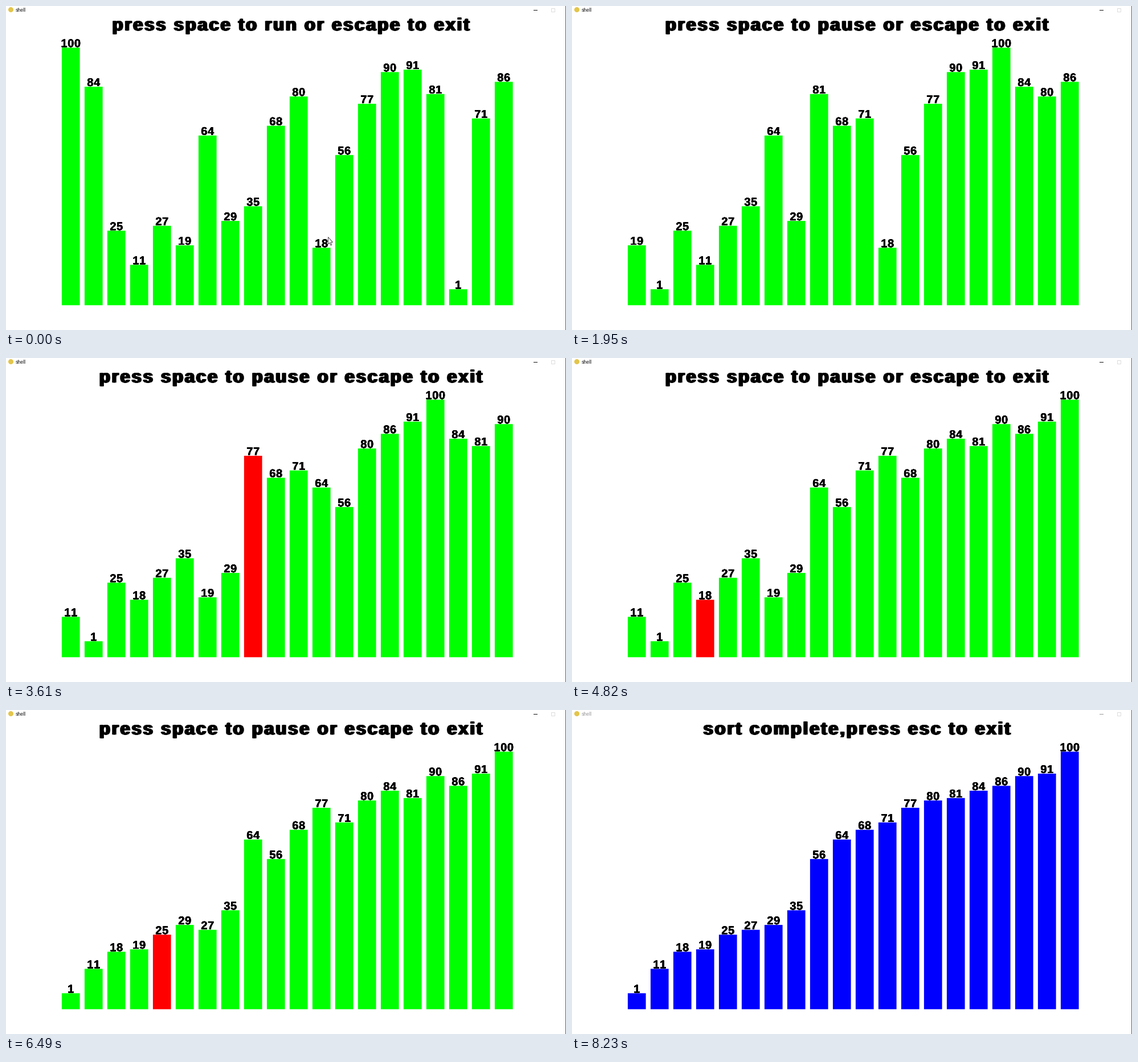
Recreate the animation shown at these times as a matplotlib script. Size 983x570 px, loop 8270 ms.

```python
import matplotlib.pyplot as plt
import numpy as np
from matplotlib.animation import FuncAnimation
from matplotlib.patches import Circle, PathPatch, Polygon, Rectangle
from matplotlib.path import Path
from matplotlib.textpath import TextPath
from matplotlib.transforms import Affine2D

WIDTH, HEIGHT, DPI = 983, 570, 100
LOOP_MS, FRAMES = 8270, 204
MOVE_START, RUN_START, DONE, BLUR = 8, 13, 195, 203

VALUES = [100, 84, 25, 11, 27, 19, 64, 29, 35, 68,
          80, 18, 56, 77, 90, 91, 81, 1, 71, 86]
GAPS = (8, 5, 3, 2, 1)
GREEN, RED, BLUE = "#00ff00", "#ff0000", "#0000ff"
LEFT, PITCH, BAR_WIDTH = 97.9, 40, 31.7
BASE, ZERO, UNIT = 526.4, 502.6, 4.293
BOLD = dict(family="Liberation Sans", weight="bold")

# Pace of the sort: animation frame against position in the step list.
PACE_FRAME = (13.25, 30, 65, 89, 118, 119, 160, 195)
PACE_STEP = (0, 33.5, 103.5, 148.5, 207.5, 207.5, 291.5, 359)


def shell_sort_steps(values):
    """Return (values, highlighted indices) for every drawing step."""
    a, steps = list(values), []

    def show(*reds, times=1):
        steps.extend([(list(a), reds)] * times)

    for gap in GAPS:
        for i in range(gap, len(a)):
            show(i)
            j = i
            while j >= gap and a[j - gap] > a[j]:
                show(j - gap, j, times=2)
                a[j - gap], a[j] = a[j], a[j - gap]
                show(j - gap, j, times=2)
                j -= gap
            show(*((j - gap, j) if j >= gap else ()))
            show()
    return steps


def heavy_text(text, center, baseline, size, weight, outline=0):
    """Tracked text whose glyphs are smeared sideways into a heavier bold."""
    def right_edge(s):
        return TextPath((0, 0), s, size=size, prop=BOLD).get_extents().x1

    bar = right_edge("|")
    advances = [right_edge(c + "|") - bar + weight for c in text]
    x = center - sum(advances) / 2
    parts = []
    for char, advance in zip(text, advances):
        if char != " ":
            glyph = TextPath((0, 0), char, size=size, prop=BOLD)
            for shift in np.linspace(0, weight, 3):
                vertices = glyph.vertices * (1, -1) + (x + shift, baseline)
                parts.append(Path(vertices, glyph.codes))
        x += advance
    return PathPatch(Path.make_compound_path(*parts), fc="black", ec="black",
                     lw=px(outline), snap=False)


def px(size):
    return size * 72 / DPI


fig = plt.figure(figsize=(WIDTH / DPI, HEIGHT / DPI), dpi=DPI, facecolor="white")
ax = fig.add_axes([0, 0, 1, 1])
ax.set(xlim=(0, WIDTH), ylim=(HEIGHT, 0))
ax.axis("off")

# Window frame
ax.add_patch(Rectangle((982, 0), 1, HEIGHT, fc="#606060", lw=0))
ax.add_patch(Circle((8.5, 6.5), 4.5, fc="#e3c54a", lw=0))
ax.add_patch(Rectangle((956.5, 3.5), 6, 6, fc="none", ec="#dcdcdc", lw=px(1)))
caption = ax.text(17, 10, "shell", family="Liberation Sans", size=px(8.7))
minimise = ax.add_patch(Rectangle((926, 7), 7, 1, lw=0))

titles = [ax.add_patch(heavy_text(text, 500, 43, size=31, weight=2.8, outline=0.4))
          for text in ("press space to run or escape to exit",
                       "press space to pause or escape to exit",
                       "sort complete,press esc to exit")]

# Every value owns a bar and a label; sorting only slides them sideways.
bars, labels = {}, {}
for value in VALUES:
    top = ZERO - UNIT * value
    bars[value] = ax.add_patch(
        Rectangle((0, top), BAR_WIDTH, BASE - top, lw=0, snap=False))
    labels[value] = ax.add_patch(
        heavy_text(str(value), BAR_WIDTH / 2, top - 1, size=20, weight=0.6))

ARROW = np.array([(0, 0), (0, 12.5), (2.6, 10), (4.5, 14.5),
                  (6.3, 13.7), (4.4, 9.4), (8, 9.2)])
cursor = ax.add_patch(Polygon(ARROW, fc="white", ec="#404040", lw=px(0.9), zorder=5))

STEPS = shell_sort_steps(VALUES)


def update(frame):
    if frame <= RUN_START:
        stage, (values, reds) = 0, (VALUES, ())
    elif frame < DONE:
        step = int(np.interp(frame, PACE_FRAME, PACE_STEP))
        stage, (values, reds) = 1, STEPS[min(step, len(STEPS) - 1)]
    else:
        stage, (values, reds) = 2, (sorted(VALUES), ())

    for i, title in enumerate(titles):
        title.set_visible(i == stage)

    for i, value in enumerate(values):
        slide = Affine2D().translate(LEFT + PITCH * i, 0) + ax.transData
        bars[value].set_transform(slide)
        labels[value].set_transform(slide)
        bars[value].set_facecolor(BLUE if stage == 2 else RED if i in reds else GREEN)

    travel = np.clip((frame - MOVE_START + 1) / (RUN_START - MOVE_START + 1), 0, 1)
    cursor.set_xy(ARROW + (565.5, 406.5 + 142 * travel))
    cursor.set_visible(stage == 0)

    tone = "#999999" if frame >= BLUR else "#111111"
    caption.set_color(tone)
    minimise.set_facecolor(tone)
    return [*bars.values(), *labels.values(), *titles, cursor, caption, minimise]


anim = FuncAnimation(fig, update, frames=FRAMES, interval=LOOP_MS / FRAMES,
                     repeat=True, repeat_delay=0, blit=False)
plt.show()
```
